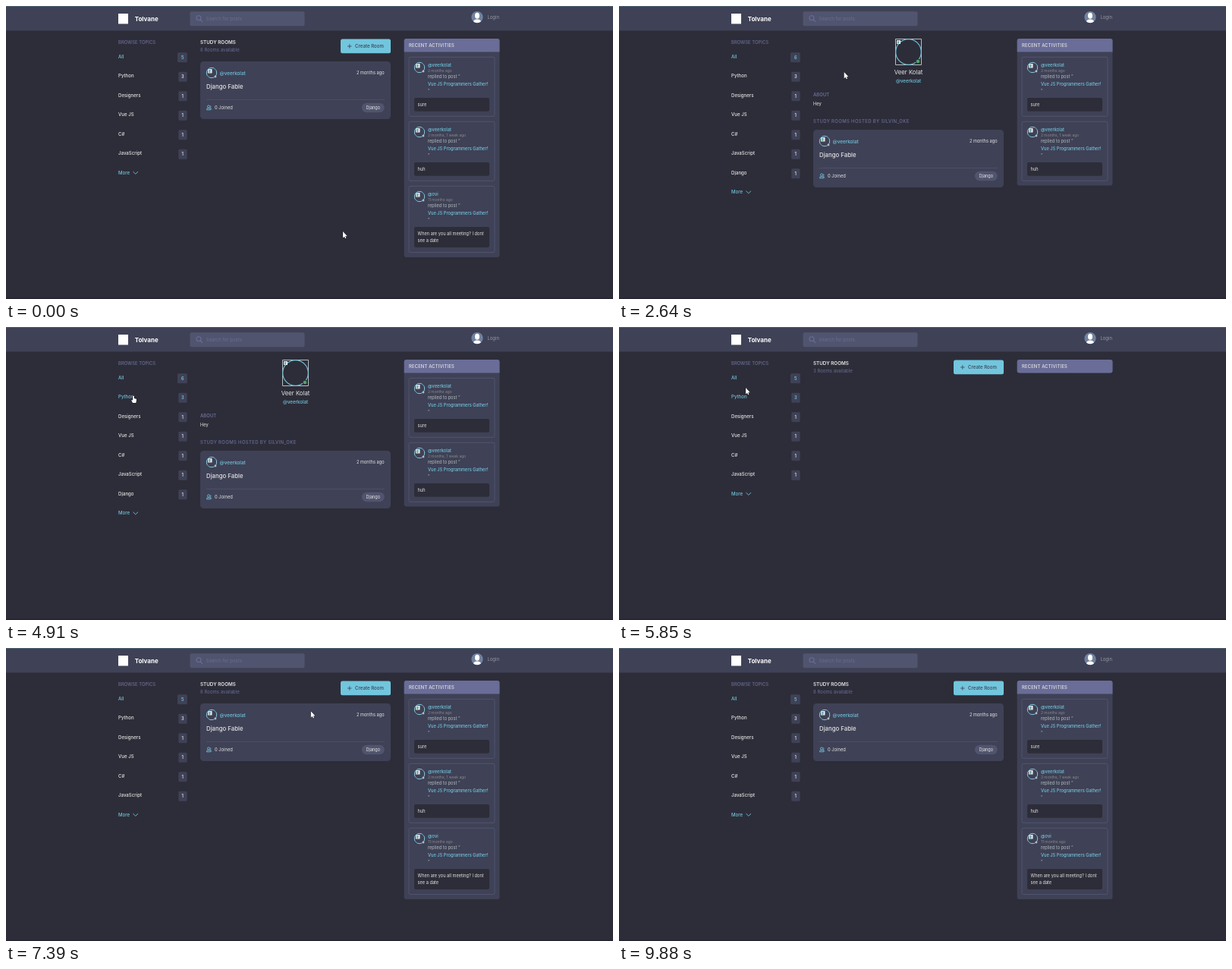
An HTML page with a canvas for the animation above (10 s loop, 800x386 px).

```html
<!DOCTYPE html>
<html lang="en">
<head>
<meta charset="utf-8">
<title>Study rooms</title>
<style>
  html, body { margin: 0; width: 100%; height: 100%; overflow: hidden; background: #2d2d39; }
  canvas { display: block; width: 800px; height: 386px; }
</style>
</head>
<body>
<canvas id="stage" width="800" height="386"></canvas>
<script>
const ctx = document.getElementById('stage').getContext('2d');
const LOOP = 10000;
const C = {
  bg: '#2d2d39', dark: '#3f4156', medium: '#51546e', violet: '#696d97',
  main: '#71c6dd', light: '#e5e5e5', gray: '#8b8b8b', soft: '#b2bdbd'
};
const USER = '@veerkolat';

// ---- drawing helpers ----
function box(x, y, w, h, r, fill, stroke) {
  ctx.beginPath();
  ctx.roundRect(x, y, w, h, r);
  if (fill) { ctx.fillStyle = fill; ctx.fill(); }
  if (stroke) { ctx.strokeStyle = stroke; ctx.lineWidth = 1; ctx.stroke(); }
}

function circle(x, y, r, fill, stroke, width = 1) {
  ctx.beginPath();
  ctx.arc(x, y, r, 0, 7);
  if (fill) { ctx.fillStyle = fill; ctx.fill(); }
  if (stroke) { ctx.strokeStyle = stroke; ctx.lineWidth = width; ctx.stroke(); }
}

function path(points, color, width = 1) {
  ctx.beginPath();
  points.forEach(([x, y]) => ctx.lineTo(x, y));
  ctx.strokeStyle = color;
  ctx.lineWidth = width;
  ctx.stroke();
}

// Text is laid out ten times larger for precise advances; y is the middle of the capitals.
function text(str, x, y, size, color, { weight = 400, align = 'left', spacing = 0 } = {}) {
  ctx.save();
  ctx.translate(x, y + size * 0.36);
  ctx.scale(0.1, 0.1);
  ctx.font = `${weight} ${size * 10}px Inter, sans-serif`;
  ctx.letterSpacing = spacing * 10 + 'px';
  ctx.textAlign = align;
  ctx.fillStyle = color;
  ctx.fillText(str, 0, 0);
  ctx.restore();
}

// ---- page parts ----
function brokenIcon(x, y, s) {
  box(x, y, s, s, 0.5, '#eef3f6');
  ctx.fillStyle = '#7fa8c4';
  ctx.fillRect(x + s * 0.15, y + s * 0.15, s * 0.55, s * 0.4);
  ctx.fillStyle = '#5b9c66';
  ctx.fillRect(x + s * 0.15, y + s * 0.6, s * 0.5, s * 0.25);
}

function smallAvatar(x, y) {
  ctx.save();
  ctx.beginPath();
  ctx.arc(x, y, 7, 0, 7);
  ctx.clip();
  box(x - 6.5, y - 6.5, 13, 13, 0, null, C.soft);
  brokenIcon(x - 5, y - 5, 5.5);
  ctx.restore();
  circle(x, y, 6.7, null, C.main, 0.8);
  circle(x + 5, y + 5, 1.4, C.soft);
}

function header(loading) {
  box(0, 0, 800, 32.5, 0, C.dark);
  box(0, 0, 800, 1, 0, '#4f6272');
  box(0, 384.5, 800, 1.5, 0, '#252530');
  box(148, 10, 13, 13.5, 0, '#fff');
  text('Tolvane', 169.7, 17, 8, '#fff', { weight: 700 });
  box(242.5, 7.3, loading ? 21 : 151, 19, 2, C.medium);
  if (loading) return;
  circle(254, 15.8, 3, null, C.violet, 1.1);
  path([[256.2, 18], [259, 20.8]], C.violet, 1.2);
  text('Search for posts', 263.5, 16.7, 6.1, C.violet);

  ctx.save();
  circle(621, 14.7, 7.6, '#71829f');
  ctx.clip();
  ctx.fillStyle = '#fff';
  ctx.beginPath();
  ctx.ellipse(621, 12.8, 3, 4, 0, 0, 7);
  ctx.ellipse(621, 21.5, 5.5, 4, 0, 0, 7);
  ctx.fill();
  ctx.restore();
  text('Login', 634.5, 14.8, 5.9, '#999aa3');
}

function topics(names, total, hovered) {
  text('BROWSE TOPICS', 148, 47.8, 5.95, C.violet, { weight: 500 });
  const counts = { All: total, Python: 3 };
  names.forEach((name, i) => {
    const y = 66.5 + i * 25.5;
    const color = name === 'All' || name === hovered ? C.main : C.light;
    text(name, 148, y, 6.1, color, { weight: 500 });
    box(name === 'All' ? 226 : 227.3, y - 5.3, name === 'All' ? 12.8 : 11.3, 13, 1.5, C.dark);
    text(counts[name] || 1, 232.7, y + 1.3, 5.6, color, { weight: 600, align: 'center' });
  });
  const y = 66.5 + names.length * 25.5;
  text('More', 148, y, 6.1, C.main, { weight: 500 });
  path([[167.5, y - 1.3], [170.7, y + 1.8], [174, y - 1.3]], C.main, 0.9);
}

function roomsHeader(count) {
  text('STUDY ROOMS', 256, 47.8, 6.3, C.light, { weight: 600 });
  text(count + ' Rooms available', 256, 58, 6.05, C.violet);
  box(441, 43.5, 66, 18.7, 2.5, C.main);
  path([[450, 53], [455.6, 53]], C.dark, 0.8);
  path([[452.8, 50.2], [452.8, 55.8]], C.dark, 0.8);
  text('Create Room', 460, 53, 6.15, C.dark, { weight: 500 });
}

function roomCard(top) {
  box(256, top, 251, 76, 4.5, C.dark);
  smallAvatar(271, top + 15);
  text(USER, 281.5, top + 15.3, 6.3, C.main, { weight: 500 });
  text('2 months ago', 498.7, top + 15.3, 5.7, C.light, { align: 'right' });
  text('Django Fable', 264, top + 33, 7.8, C.light, { weight: 500 });
  path([[264, top + 50.4], [499, top + 50.4]], C.medium, 0.8);
  const y = top + 61;
  circle(267, y - 1.5, 1.6, null, C.main, 0.8);
  path([[264.4, y + 2.8], [265, y + 0.9], [269, y + 0.9], [269.6, y + 2.8], [264.4, y + 2.8]], C.main, 0.8);
  path([[269.2, y - 2.8], [270, y - 1.3], [269.4, y], [271, y + 2.6]], C.main, 0.7);
  text('0 Joined', 275, y, 5.8, C.light);
  box(469, y - 6.2, 29.7, 12.4, 6.2, C.medium);
  text('Django', 483.8, y - 0.2, 5.6, C.light, { align: 'center' });
}

const ACTIVITIES = [
  { user: USER, ago: '2 months ago', lines: ['sure'] },
  { user: USER, ago: '2 months, 1 week ago', lines: ['huh'] },
  { user: '@ovi', ago: '11 months ago', lines: ['When are you all meeting? I dont', 'see a date'] }
];

function activityPanel(count) {
  const bottom = [60.5, 0, 236.5, 331][count];
  box(524.7, 43, 125.8, bottom - 43, 3, C.dark);
  box(524.7, 43, 125.8, 17.5, count ? [3, 3, 0, 0] : 3, C.violet);
  text('RECENT ACTIVITIES', 531, 51.8, 5.9, C.light, { weight: 500, spacing: 0.15 });
  ACTIVITIES.slice(0, count).forEach(({ user, ago, lines }, i) => {
    const y = 67 + i * 85;
    const extra = (lines.length - 1) * 9.3;
    box(531, y + 0.3, 113, 78 + extra, 2, null, C.medium);
    smallAvatar(545, y + 14);
    text(user, 556, y + 11, 5.7, C.main, { weight: 500 });
    text(ago, 556, y + 18, 4.9, C.gray);
    text('replied to post “', 556, y + 26.3, 5.65, C.soft);
    text('Vue JS Programmers Gather!', 556, y + 35.5, 5.7, C.main, { weight: 500 });
    text('”', 556, y + 44.5, 5.65, C.soft);
    box(538, y + 54, 99, 17.7 + extra, 2, C.bg);
    lines.forEach((line, n) => text(line, 542.6, y + 62.7 + n * 9, 5.63, C.light));
  });
}

function profileHead() {
  const mid = 381.5;
  box(364.5, 43.5, 34, 34, 0, null, C.soft);
  circle(mid, 60.5, 16.8, null, C.main, 1.1);
  brokenIcon(366, 45, 5);
  circle(394, 73, 2.8, '#4fa76a', C.bg);
  text('Veer Kolat', mid, 87.3, 7.8, C.light, { align: 'center' });
  text(USER, mid, 98.7, 6.1, C.main, { weight: 500, align: 'center' });
  text('ABOUT', 256, 117, 6, C.violet, { weight: 600 });
  text('Hey', 256, 129, 5.8, C.light);
  text('STUDY ROOMS HOSTED BY SILVIN_OKE', 256, 152, 6, C.violet, { weight: 500, spacing: 0.33 });
}

// ---- pages ----
const TOPICS = ['All', 'Python', 'Designers', 'Vue JS', 'C#', 'JavaScript'];
const pages = {
  loading() {},
  home() {
    topics(TOPICS, 5);
    roomsHeader(8);
    roomCard(73);
    activityPanel(3);
  },
  profile(hovered) {
    topics([...TOPICS, 'Django'], 6, hovered);
    profileHead();
    roomCard(163);
    activityPanel(2);
  },
  python(hovered) {
    topics(TOPICS, 5, hovered);
    roomsHeader(3);
    activityPanel(0);
  }
};
const SCHEDULE = [
  [0, 'home'], [2400, 'loading'], [2520, 'profile'], [4950, 'python'],
  [6850, 'loading'], [7060, 'home']
];

// ---- pointer: time, x, y ----
const POINTER = [
  [0, 444, 297], [30, 444, 297], [1030, 392, 112], [1850, 372, 98], [2150, 298, 87],
  [2950, 296, 87], [3390, 139, 44], [3600, 118, 50], [4150, 164, 90], [4610, 168, 91],
  [5500, 168, 91], [5850, 167, 80], [6330, 159, 68], [6760, 159, 67], [6970, 404, 75],
  [7760, 400, 90], [8240, 149, 118], [8670, 64, 13]
];
const HAND_TIMES = [[2130, 2420], [4180, 5700], [6330, 6790], [8190, 8290]];
const within = (t, [from, to]) => t >= from && t < to;

function pointerAt(t) {
  const i = POINTER.findIndex(key => key[0] > t);
  const [t0, x0, y0] = POINTER[i - 1], [t1, x1, y1] = POINTER[i];
  const u = (t - t0) / (t1 - t0);
  const e = u * u * (3 - 2 * u);
  return [x0 + (x1 - x0) * e, y0 + (y1 - y0) * e];
}

const ARROW = new Path2D('M0 0V8.4L1.9 6.7L3.1 9.3L4.4 8.7L3.2 6.2H5.8Z');
const HAND = new Path2D('M-.9 0Q0 -1.2 .8 0V3L3.6 3.8Q4.2 4 4 5.2L3.3 9H-1L-2.8 5.6Q-2.6 4.4 -.9 5.6Z');

function drawPointer(t) {
  let x = -0.5, y = -0.5;
  if (t < 8670) [x, y] = pointerAt(t);
  else if (!within(t, [8910, 9090])) return;
  const shape = HAND_TIMES.some(span => within(t, span)) ? HAND : ARROW;
  ctx.save();
  ctx.translate(x, y);
  ctx.lineWidth = 1;
  ctx.strokeStyle = '#15151c';
  ctx.stroke(shape);
  ctx.fillStyle = '#fff';
  ctx.fill(shape);
  ctx.restore();
}

function draw(now) {
  const t = now % LOOP;
  const page = SCHEDULE.findLast(([start]) => start <= t)[1];
  box(0, 0, 800, 386, 0, C.bg);
  header(page === 'loading');
  pages[page](within(t, [4180, 5940]) ? 'Python' : null);
  drawPointer(t);
}

const start = performance.now();
function tick() {
  draw(performance.now() - start);
  requestAnimationFrame(tick);
}
tick();
</script>
</body>
</html>
```
